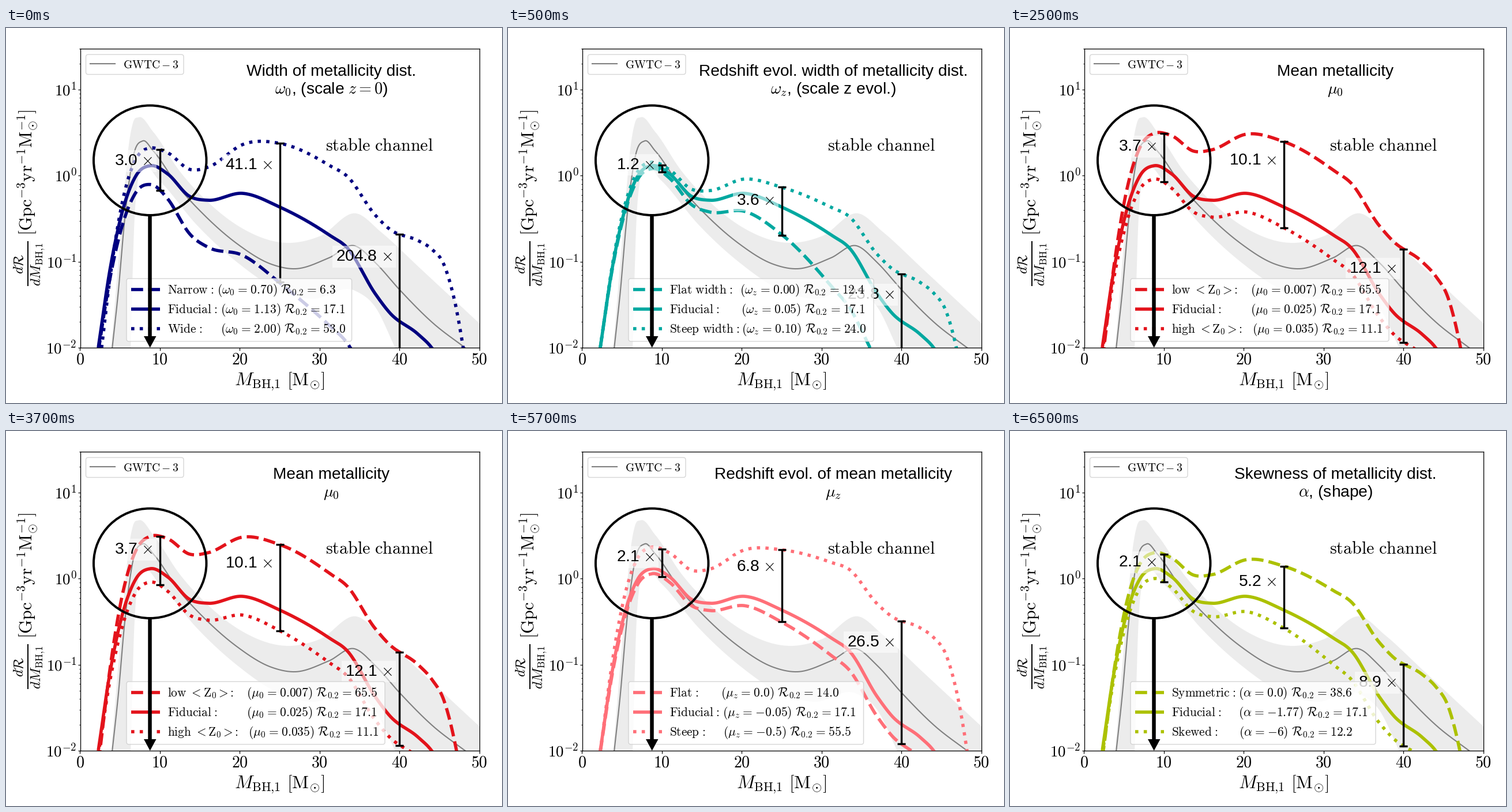
Recreate the animation shown at these times as a matplotlib script. Size 860 by 651 pixels, loop 8000 ms.

```python
import numpy as np
import matplotlib.pyplot as plt
from matplotlib.animation import FuncAnimation
from matplotlib.patches import Ellipse, FancyBboxPatch, Polygon

W, H, DPI = 860, 651, 100
PT = 72 / DPI                      # points per pixel
LEFT, RIGHT, TOP, BOTTOM = 128.5, 820.7, 35.7, 555.3
DECADE = 149.45                    # pixels per factor of ten
UNIT = (RIGHT - LEFT) / 50         # pixels per solar mass

plt.rcParams.update({"font.family": "Liberation Sans", "mathtext.fontset": "cm"})
fig = plt.figure(figsize=(W / DPI, H / DPI), dpi=DPI, facecolor="white")

# The axes use stage pixels as data units.
ax = fig.add_axes([LEFT / W, 1 - BOTTOM / H, (RIGHT - LEFT) / W, (BOTTOM - TOP) / H])
ax.set(xlim=(LEFT, RIGHT), ylim=(BOTTOM, TOP))


def mass_x(mass):
    return LEFT + UNIT * mass


def rate_y(rate):
    return BOTTOM - DECADE * (np.log10(rate) + 2)


def put(x, y, text, size, **kw):
    return ax.text(x, y, text, fontsize=size * PT, **{"va": "baseline", **kw})


def cm(x, y, formula, size, **kw):
    """Computer Modern text, with relations spaced as in TeX."""
    formula = formula.replace("=", r"\hspace{0.08}=\hspace{0.08}")
    return put(x, y, f"${formula}$", size, **kw)


def smooth(points, n=700):
    """Cubic Hermite curve through a few key points."""
    x, y = np.array(list(points), float).T
    slope = np.gradient(y, x)
    t = np.linspace(x[0], x[-1], n)
    i = np.clip(np.searchsorted(x, t) - 1, 0, len(x) - 2)
    h = x[i + 1] - x[i]
    s = (t - x[i]) / h
    return t, ((1 + 2 * s) * (1 - s) ** 2 * y[i] + s * (1 - s) ** 2 * h * slope[i]
               + s * s * (3 - 2 * s) * y[i + 1] + s * s * (s - 1) * h * slope[i + 1])


def legend_box(x0, y0, x1, y1):
    return ax.add_patch(FancyBboxPatch(
        (x0, y0), x1 - x0, y1 - y0, boxstyle="round,pad=0,rounding_size=4",
        fc="white", ec="0.8", alpha=0.8, lw=1.4 * PT, zorder=6))


def draw_axes():
    for spine in ax.spines.values():
        spine.set_linewidth(1.3 * PT)
    masses, powers = range(0, 51, 10), range(-2, 2)
    ax.set_xticks([mass_x(m) for m in masses], labels=[""] * len(masses))
    ax.set_yticks([rate_y(10.0 ** k) for k in powers], labels=[""] * len(powers))
    minor = [m * 10.0 ** k for k in powers for m in range(2, 10)]
    ax.set_yticks([rate_y(r) for r in minor if r <= 30], minor=True)
    ax.tick_params(which="major", length=4.5 * PT, width=1.2 * PT)
    ax.tick_params(which="minor", length=2.5 * PT, width=0.9 * PT)

    for m in masses:
        cm(mass_x(m), 584, str(m), 28, ha="center")
    for k in powers:
        cm(122.5, rate_y(10.0 ** k) + 10, f"10^{{{k}}}", 27, ha="right")

    cm(474.5, 620, r"M_{\mathrm{BH{,}1}}\ [\mathrm{M}_{\odot}]", 31.5, ha="center")
    turned = dict(rotation=90, rotation_mode="anchor")
    cm(46, 409, r"\frac{d\mathcal{R}}{dM_{\mathrm{BH{,}1}}}", 35, ha="center", **turned)
    cm(46, 360, r"[\mathrm{Gpc}^{-3}\mathrm{yr}^{-1}\mathrm{M}_{\odot}^{-1}]", 30.7, **turned)


def draw_observations():
    median = smooth([(184, 557), (195, 455), (205, 340), (213, 270), (220, 226), (237, 196),
                     (255, 213), (300, 277), (345, 326), (400, 374), (460, 410), (500, 418),
                     (560, 399), (604, 378), (640, 407), (683, 455), (740, 512), (800, 558)])
    upper = smooth([(182, 560), (203, 310), (212, 210), (220, 165), (230, 155), (255, 180),
                    (300, 247), (350, 302), (410, 348), (490, 373), (545, 361), (608, 322),
                    (650, 354), (720, 419), (821, 513)])
    lower = smooth([(216, 560), (222, 350), (229, 262), (240, 243), (265, 264), (330, 341),
                    (400, 406), (480, 458), (530, 470), (605, 456), (640, 484), (677, 560)])
    band = np.vstack([np.column_stack(upper), [(821, 560)], np.column_stack(lower)[::-1]])
    ax.add_patch(Polygon(band, fc="#ececec", ec="none", zorder=1))
    ax.plot(*median, color="0.5", lw=2.1 * PT, zorder=2)

    legend_box(138.5, 46, 308, 80.5)
    ax.plot([146, 189], [62, 62], color="0.5", lw=2.1 * PT, zorder=7)
    cm(203, 69.5, r"\mathrm{GWTC}-3", 19.5, zorder=7)


def draw_highlight():
    ax.add_patch(Ellipse((249.7, 229.7), 195.5, 190.5, fill=False, lw=4 * PT, zorder=8))
    ax.plot([249.5, 249.5], [324, 540], color="black", lw=6.5 * PT,
            solid_capstyle="butt", zorder=8)
    ax.add_patch(Polygon([(239, 535), (260.5, 535), (249.7, 555)], fc="black", ec="none", zorder=8))


FIDUCIAL = smooth([(160, 555), (180, 421), (200, 325), (225, 257), (250, 239), (280, 253),
                   (318, 292), (350, 299), (410, 287), (475, 311), (560, 359), (592, 382),
                   (640, 461), (665, 494), (715, 532), (738, 555), (760, 592), (790, 725),
                   (800, 790)])
ANCHORS = (2.5, 5, 10, 15, 25, 35, 40, 47)


def scaled(*dex):
    """Fiducial curve times a ratio, given as log10 at the anchor masses."""
    x, y = FIDUCIAL
    ratio = smooth((mass_x(m), d) for m, d in zip(ANCHORS, dex))
    return x, y - DECADE * np.interp(x, *ratio)


def ratio_bar(x, top, factor):
    """Bar spanning the given ratio, labelled at the mean of its two rates."""
    ratio = float(factor)
    bottom = top + DECADE * np.log10(ratio)
    style = dict(color="black", lw=3.4 * PT, solid_capstyle="butt", zorder=5)
    artists = ax.plot([x, x], [top, bottom], **style)
    for y in (top, bottom):
        artists += ax.plot([x - 7, x + 7], [y, y], **style)
    mean = top - DECADE * np.log10((1 + 1 / ratio) / 2)
    box = dict(boxstyle="square,pad=0.21", fc="white", ec="none", alpha=0.55)
    artists.append(put(x - 12, mean + 1, rf"{factor} $\times$", 28.1,
                       ha="right", bbox=box, zorder=4))
    return artists


def scene(color, title, symbol, dashed, dotted, factors, right, rows):
    artists = [put(564.3, 82.5, title, 28.1, ha="center"),
               put(564.3, 114, symbol, 28.1, ha="center"),
               legend_box(209, 435, right, 544)]
    styles = ("--", "-", ":")
    line = dict(color=color, lw=5.6 * PT, solid_capstyle="butt")
    for style, points in zip(styles, (dashed, FIDUCIAL, dotted)):
        artists += ax.plot(*points, ls=style, zorder=3, **line)
    for mass, factor in zip((10, 25, 40), factors):
        x = mass_x(mass)
        top = min(np.interp(x, *points) for points in (dashed, dotted))
        artists += ratio_bar(x, top, factor)
    for k, (style, (name, x, value, rate)) in enumerate(zip(styles, rows)):
        y = 453.5 + 34 * k
        artists += ax.plot([217, 267.5], [y, y], ls=style, zorder=7, **line)
        artists.append(cm(280.5, y + 7.7, name + r"\hspace{0.1}:", 21.3, zorder=7))
        artists.append(cm(x - 2, y + 7.7, rf"({value})\ \mathcal{{R}}_{{0.2}}={rate}",
                          21.5, zorder=7))
    return artists


draw_axes()
draw_observations()
draw_highlight()
cm(554, 213, r"\mathrm{stable\ channel}", 30)

MEAN_Z = r"\ <\mathrm{Z}_0>\hspace{-0.35}"

SCENES = [
    scene("navy", "Width of metallicity dist.", r"$\omega_0$, (scale $z=0$)",
          scaled(-.05, -.15, -.25, -.50, -.88, -1.15, -1.30, -1.40),
          scaled(-.30, .08, .22, .35, .74, .86, 1.01, 1.25),
          ("3.0", "41.1", "204.8"), 599.5,
          [(r"\mathrm{Narrow}", 368, r"\omega_0=0.70", "6.3"),
           (r"\mathrm{Fiducial}", 374, r"\omega_0=1.13", "17.1"),
           (r"\mathrm{Wide}", 374, r"\omega_0=2.00", "53.0")]),
    scene("#00a8a0", "Redshift evol. width of metallicity dist.",
          r"$\omega_z$, (scale z evol.)",
          scaled(0, -.03, -.04, -.12, -.32, -.74, -.83, -1.00),
          scaled(0, .05, .04, .10, .23, .40, .55, .69),
          ("1.2", "3.6", "23.8"), 634,
          [(r"\mathrm{Flat\ width}", 404, r"\omega_z=0.00", "12.4"),
           (r"\mathrm{Fiducial}", 406, r"\omega_z=0.05", "17.1"),
           (r"\mathrm{Steep\ width}", 407, r"\omega_z=0.10", "24.0")]),
    scene("#e3131b", "Mean metallicity", r"$\mu_0$",
          scaled(-.13, .20, .41, .56, .76, .76, .84, .81),
          scaled(-.05, -.13, -.16, -.19, -.24, -.29, -.24, -.25),
          ("3.7", "10.1", "12.1"), 657,
          [(r"\mathrm{low}" + MEAN_Z, 419, r"\mu_0=0.007", "65.5"),
           (r"\mathrm{Fiducial}", 419, r"\mu_0=0.025", "17.1"),
           (r"\mathrm{high}" + MEAN_Z, 422, r"\mu_0=0.035", "11.1")]),
    scene("#ff6f78", "Redshift evol. of mean metallicity", r"$\mu_z$",
          scaled(-.02, -.05, -.06, -.08, -.14, -.23, -.23, -.25),
          scaled(0, .19, .26, .37, .70, 1.00, 1.20, 1.39),
          ("2.1", "6.8", "26.5"), 616.5,
          [(r"\mathrm{Flat}", 371, r"\mu_z=0.0", "14.0"),
           (r"\mathrm{Fiducial}", 374, r"\mu_z={-}0.05", "17.1"),
           (r"\mathrm{Steep}", 375, r"\mu_z={-}0.5", "55.5")]),
    scene("#acc100", "Skewness of metallicity dist.", r"$\alpha$, (shape)",
          scaled(-.08, .11, .20, .31, .51, .59, .70, .77),
          scaled(-.04, -.09, -.12, -.15, -.21, -.33, -.25, -.25),
          ("2.1", "5.2", "8.9"), 634,
          [(r"\mathrm{Symmetric}", 398, r"\alpha=0.0", "38.6"),
           (r"\mathrm{Fiducial}", 398, r"\alpha={-}1.77", "17.1"),
           (r"\mathrm{Skewed}", 399, r"\alpha={-}6", "12.2")]),
]
STEP, LOOP = 500, 8000             # milliseconds


def update(frame):
    current = (frame + 3) // 4     # first slide shows briefly, the others for up to 2 s
    for index, artists in enumerate(SCENES):
        for artist in artists:
            artist.set_visible(index == current)
    return []


anim = FuncAnimation(fig, update, frames=LOOP // STEP, interval=STEP, repeat=True)
plt.show()
```
